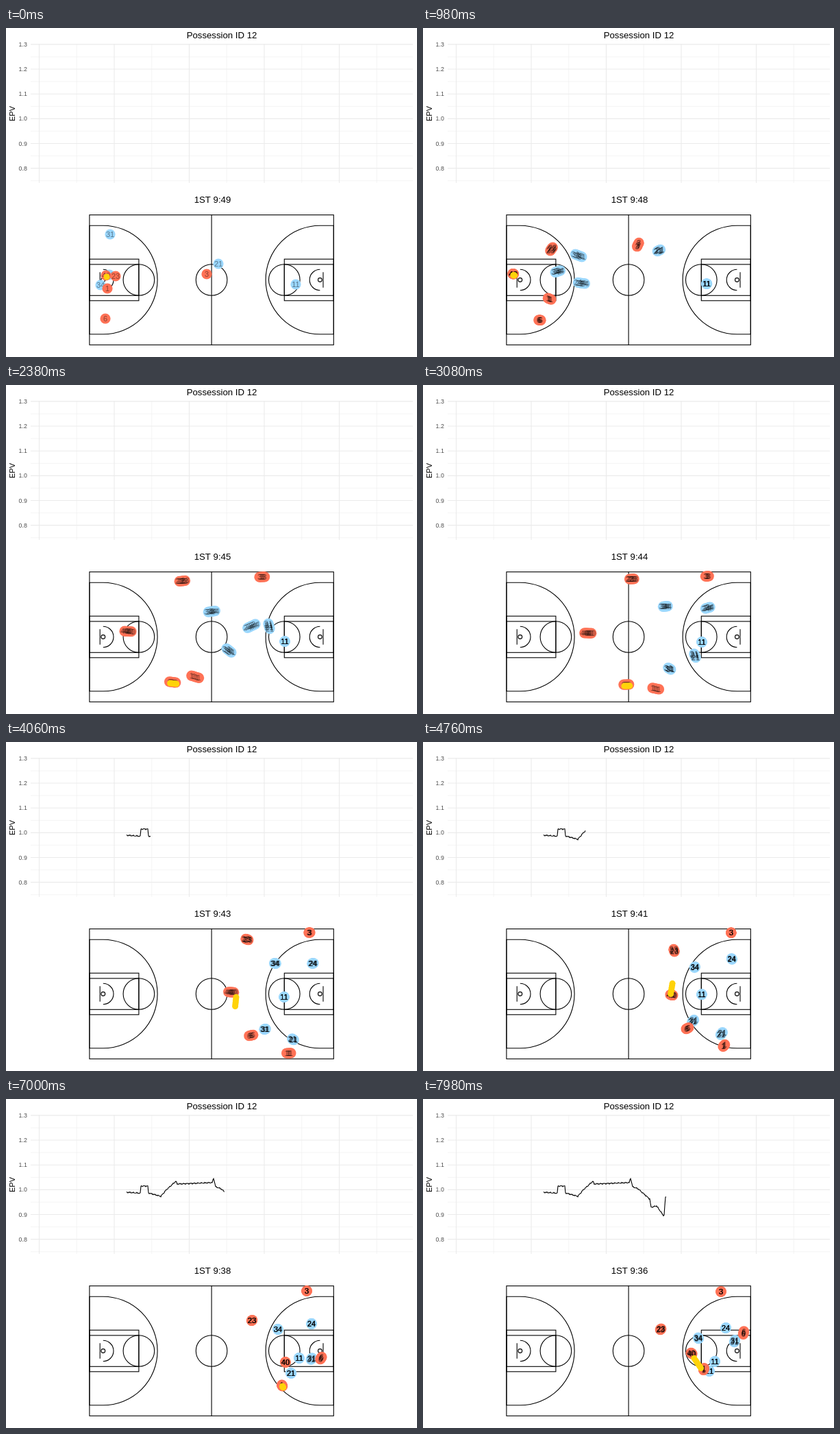
An HTML page with a canvas that plays this animation: 600 by 480 pixels, repeating every 8000 ms.

```html
<!DOCTYPE html>
<html lang="en">
<head>
<meta charset="utf-8">
<title>Possession chart</title>
<style>
html, body { margin: 0; width: 600px; height: 480px; overflow: hidden; background: #fff; }
canvas { display: block; }
</style>
</head>
<body>
<canvas id="stage" width="600" height="480"></canvas>
<script>
const ctx = document.getElementById('stage').getContext('2d');
const LOOP = 8000, STEP = 140, SAMPLES = 6, TAU = Math.PI * 2;
const FONT = '"Liberation Sans", Arial, sans-serif';

// Every player passes through one waypoint (x, y) at each of these steps.
const times = [0, 12.6, 21.6, 28.6, 39.6, 49.6, 56.6];
const blue = {
  34: [138,375, 254,339, 354,323, 393,323, 391,336, 397,336, 402,349],
  31: [152,301, 290,362, 360,414, 378,419, 415,388, 446,379, 455,353],
  24: [151,360, 305,372, 416,325, 448,323, 445,311, 446,328, 442,334],
  21: [310,344, 372,324, 397,395, 419,434, 447,402, 416,400, 418,397],
  11: [423,374, 408,373, 407,375, 406,372, 411,366, 428,378, 426,383]
};
const red = {
  40: [146,361, 140,358, 241,362, 329,365, 385,375, 408,384, 392,371],
  23: [160,362, 221,294, 305,283, 352,288, 370,324, 359,323, 347,336],
  3: [293,359, 341,286, 415,279, 443,278, 449,279, 439,280, 435,281],
  6: [145,424, 204,429, 297,437, 358,428, 412,403, 460,378, 468,341],
  1: [148,380, 229,411, 340,443, 413,454, 446,424, 403,418, 410,394]
};
// Who has the ball, and until when; it flies straight in between.
const holds = [
  { id: 40, from: 0, to: 9 }, { id: 6, from: 11, to: 25 }, { id: 40, from: 29.3, to: 33 },
  { id: 23, from: 36, to: 46 }, { id: 1, from: 49, to: 55.8 }, { id: 40, from: 57.4, to: 60 }
];
// Corners of the value curve; a ripple adds the fine detail.
const corners = [[176, 136], [196, 137.5], [197, 127], [207, 127], [208, 137], [226, 142], [234, 132.5],
  [248, 120], [250, 124], [301, 122], [303, 115.5], [306, 128], [314, 131], [331, 146], [333, 158],
  [341, 156], [351, 170], [352, 169], [354, 143], [356, 143]];

const lerp = (a, b, s) => a + (b - a) * s;

// Smooth position of a player at step u.
function at(path, u) {
  const last = times.length - 1;
  const i = Math.max(0, Math.min(times.findIndex(t => t > u) + last, 2 * last - 1) % last - 1);
  const seg = u >= times[last] ? last - 1 : Math.max(0, times.findIndex(t => t > u) - 1);
  const span = times[seg + 1] - times[seg], s = (u - times[seg]) / span;
  return [0, 1].map(axis => {
    const p = j => path[j * 2 + axis];
    const slope = j => (p(j + 1) - p(j)) / (times[j + 1] - times[j]);
    const tangent = j => {
      if (j === 0) return slope(0);
      if (j === last) return slope(last - 1);
      return lerp(slope(j - 1), slope(j), (times[j] - times[j - 1]) / (times[j + 1] - times[j - 1]));
    };
    const end = tangent(seg + 1);
    if (s > 1) return p(last) + end * (u - times[last]);
    return lerp(p(seg), p(seg + 1), s * s * (3 - 2 * s))
      + span * s * (1 - s) * (tangent(seg) * (1 - s) - end * s);
  });
}

function ballAt(u) {
  const i = holds.findIndex((h, j) => j === holds.length - 1 || u < holds[j + 1].from);
  const now = holds[i], next = holds[i + 1];
  const a = at(red[now.id], Math.min(u, now.to));
  const flight = next ? Math.max(0, (u - now.to) / (next.from - now.to)) : 0;
  const b = next ? at(red[next.id], next.from) : a;
  return [lerp(a[0], b[0], flight) + 1, lerp(a[1], b[1], flight) + 2];
}

function valueAt(x) {
  const i = Math.max(1, corners.findIndex(c => c[0] >= x));
  const [x0, y0] = corners[i - 1], [x1, y1] = corners[i];
  return lerp(y0, y1, (x - x0) / (x1 - x0)) + Math.sin(x * 1.9) * Math.sin(x * 0.7);
}

function line(x1, y1, x2, y2) {
  ctx.beginPath();
  ctx.moveTo(x1, y1);
  ctx.lineTo(x2, y2);
  ctx.stroke();
}

function arc(x, y, r, from = 0, to = TAU) {
  ctx.beginPath();
  ctx.arc(x, y, r, from, to);
  ctx.stroke();
}

function disc([x, y], r) {
  ctx.beginPath();
  ctx.arc(x, y, r, 0, TAU);
  ctx.fill();
}

function text(str, x, y, size, color, align = 'center') {
  ctx.font = size + 'px ' + FONT;
  ctx.fillStyle = color;
  ctx.textAlign = align;
  ctx.fillText(str, x, y);
}

function drawGrid(width, x0, y0) {
  ctx.strokeStyle = '#ebebeb';
  ctx.lineWidth = width;
  for (let x = x0; x < 594; x += 109.5) line(x, 23, x, 226);
  for (let y = y0; y < 226; y += 36.15) line(36, y, 594, y);
}

function drawChart(step) {
  drawGrid(0.55, 103.2, 42);
  drawGrid(1.1, 48.5, 23.9);
  text('Possession ID 12', 315, 15, 13.2, '#000');
  for (let i = 0; i < 6; i++) text((1.3 - i / 10).toFixed(1), 30.8, 27 + i * 36.15, 8.8, '#4d4d4d', 'right');
  ctx.save();
  ctx.translate(13, 125);
  ctx.rotate(-Math.PI / 2);
  text('EPV', 0, 0, 11, '#000');
  ctx.restore();

  const end = 176 + 5.13 * (step - 22);
  ctx.strokeStyle = '#000';
  ctx.lineWidth = 1.1;
  ctx.beginPath();
  for (let x = 176; x < end; x++) ctx.lineTo(x, valueAt(x));
  ctx.stroke();
}

function drawHalf() {
  const q = Math.PI / 2, cy = 367.5;
  ctx.strokeRect(121.9, 337.2, 72, 60.6);
  ctx.strokeRect(121.9, 344.9, 72, 45.4);
  arc(193.9, cy, 22.8);
  arc(141.8, cy, 2.9);
  arc(141.8, cy, 15.2, -q, q);
  line(137.2, 356.2, 137.2, 378.8);
  ctx.beginPath();
  ctx.moveTo(121.9, 288.2);
  ctx.arc(141.8, cy, 79.3, -q, q);
  ctx.lineTo(121.9, 446.8);
  ctx.closePath();
  ctx.stroke();
}

function drawCourt() {
  ctx.strokeStyle = '#000';
  ctx.lineWidth = 1.1;
  ctx.strokeRect(121.9, 272.7, 356.4, 189.6);
  line(300.1, 272.7, 300.1, 462.3);
  arc(300.1, 367.5, 22.8);
  drawHalf();
  ctx.save();
  ctx.translate(600.2, 0);
  ctx.scale(-1, 1);
  drawHalf();
  ctx.restore();
}

function drawTeam(team, color, moments) {
  const marks = Object.entries(team).flatMap(([id, path]) => moments.map(u => [id, at(path, u)]));
  ctx.fillStyle = color;
  for (const [, pos] of marks) disc(pos, 7.6);
  for (const [id, [x, y]] of marks) text(id, x, y + 4, 11, 'rgba(0,0,0,.45)');
}

function draw(now) {
  const step = Math.floor(now % LOOP / STEP);
  ctx.fillStyle = '#fff';
  ctx.fillRect(0, 0, 600, 480);
  drawChart(step);

  const clock = Math.floor(589.9 - 0.234 * step);
  text(`1ST ${Math.floor(clock / 60)}:${String(clock % 60).padStart(2, '0')}`, 301.5, 255, 13.2, '#000');
  drawCourt();

  // The tracking samples since the previous step are overprinted.
  const moments = Array.from({ length: SAMPLES }, (_, k) => step - k / SAMPLES).filter(u => u >= 0);
  drawTeam(blue, '#9bd7fd', moments);
  drawTeam(red, '#ff7256', moments);
  ctx.fillStyle = '#ffd30a';
  for (const u of moments) disc(ballAt(u), 4.5);
}

const start = performance.now();
function tick() {
  draw(performance.now() - start);
  requestAnimationFrame(tick);
}
tick();
</script>
</body>
</html>
```
